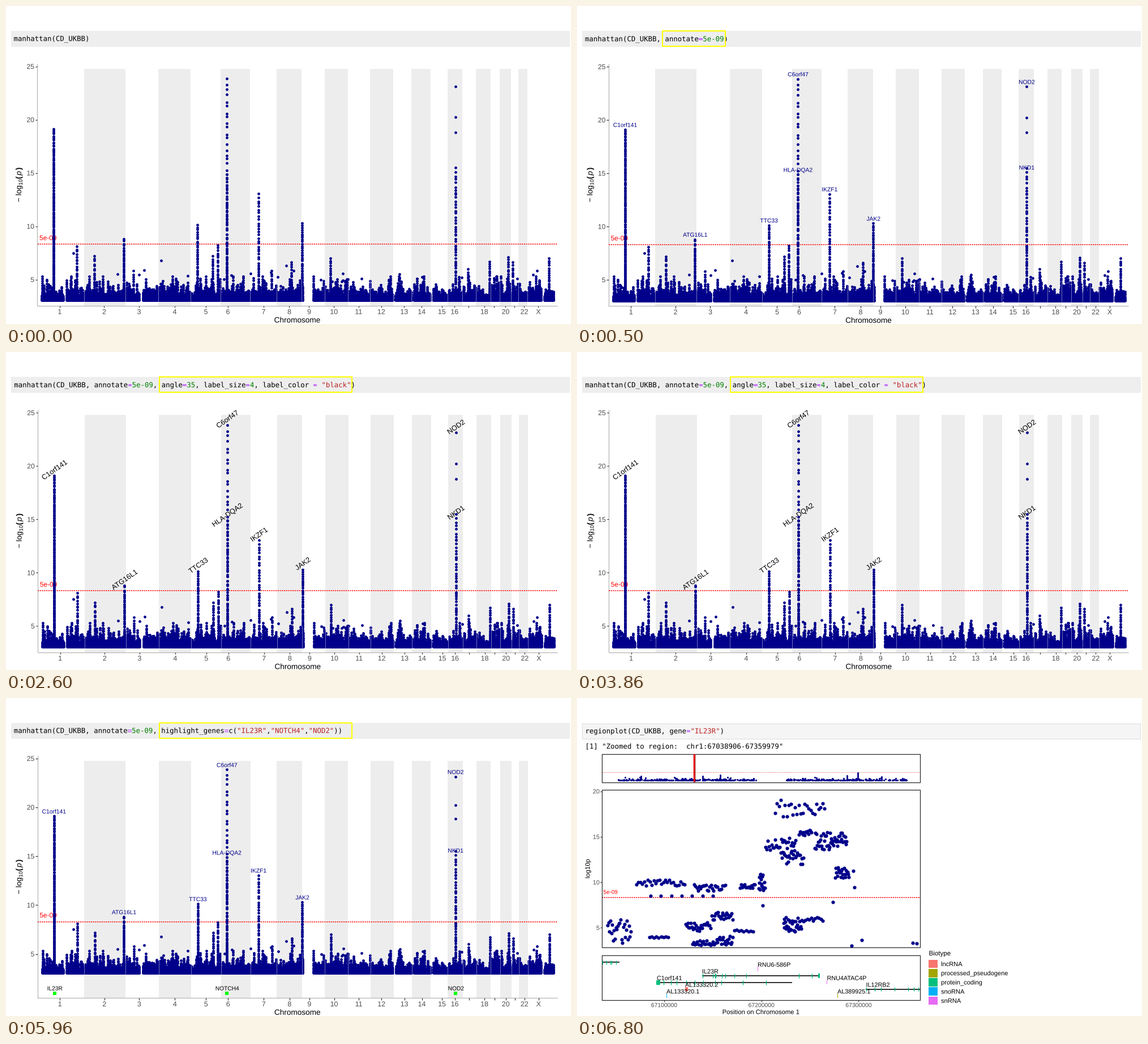
Animation of 998x561 px, one loop 8 s. Source, as a matplotlib script:

```python
import numpy as np
import matplotlib.pyplot as plt
from matplotlib.animation import FuncAnimation
from matplotlib.patches import PathPatch, Rectangle
from matplotlib.textpath import TextPath
from matplotlib.transforms import Affine2D

W, H = 998, 561
PT = 0.72  # points per pixel at 100 dpi
NAVY, RED, PURPLE, GREEN, CRIMSON = "#00008b", "#ff0000", "#aa22ff", "#008000", "#ba2121"
MONO_STEP = 7.44

plt.rcParams.update({
    "mathtext.fontset": "custom", "mathtext.rm": "Liberation Sans",
    "mathtext.it": "Liberation Sans:italic", "mathtext.bf": "Liberation Sans:bold",
})
fig = plt.figure(figsize=(W / 100, H / 100), dpi=100, facecolor="white")
rng = np.random.default_rng(23)


# ---------- drawing helpers, all in pixels with y downwards ----------
def new_scene():
    ax = fig.add_axes([0, 0, 1, 1], label=str(len(fig.axes)))
    ax.set(xlim=(0, W), ylim=(H, 0))
    ax.axis("off")
    return ax


def text(ax, x, y, s, size, color="black", ha="center", angle=0, family="Liberation Sans", z=3):
    """Place text with the middle of its capitals at height y."""
    path = TextPath((0, 0), s, size=size, prop={"family": family})
    ink = path.get_extents()
    anchor = {"left": 0, "center": (ink.x0 + ink.x1) / 2, "right": ink.x1}[ha]
    place = (Affine2D().translate(-anchor, -0.36 * size).rotate_deg(angle)
             .scale(1, -1).translate(x, y))
    ax.add_patch(PathPatch(path, facecolor=color, lw=0, zorder=z,
                           transform=place + ax.transData))


def line(ax, xs, ys, color="black", width=1.0, z=2, **kw):
    ax.plot(xs, ys, color=color, lw=width * PT, zorder=z,
            solid_capstyle="butt", dash_capstyle="butt", **kw)


def box(ax, x0, y0, x1, y1, fill="none", edge="none", width=0, z=1):
    ax.add_patch(Rectangle((x0, y0), x1 - x0, y1 - y0, facecolor=fill,
                           edgecolor=edge, lw=width * PT, zorder=z))


def dots(ax, x, y, size, z=4):
    ax.plot(x, y, "o", color=NAVY, ms=size * PT, mew=0, zorder=z)


def code(ax, x, y, *runs):
    for run in runs:
        s, color = run if isinstance(run, tuple) else (run, "black")
        text(ax, x, y, s, 12.36, color, "left", family="DejaVu Sans Mono")
        x += MONO_STEP * len(s)


def dotted(ax, x0, x1, y):
    line(ax, [x0, x1], [y, y], RED, 1.5, linestyle=(0, (1.5, 1.0)))


# ---------- genome-wide data ----------
WIDTHS = [74.5, 73, 58.5, 57, 53, 52, 46.5, 44.5, 40.5, 41, 39.5, 41,
          32, 33.5, 30, 26.5, 24, 25.5, 16.5, 20, 13, 16, 46]
EDGES = 64 + np.concatenate([[0], np.cumsum(WIDTHS)])
TICKS = [95.5, 174, 235.5, 298.5, 353.5, 392.5, 455.5, 501, 536, 580, 623.5, 663.5,
         704, 735, 770.5, 793, 818, 845.5, 863, 883, 899, 916, 941]
GAPS = [(102, 107), (236, 242), (525, 543), (684, 688), (717, 721), (750, 755), (946, 951)]

# gene, x, top, points in its tower
GENES = [("C1orf141", 85, 19.1, 150), ("C6orf47", 390.5, 23.85, 55),
         ("HLA-DQA2", 390.5, 14.88, 50), ("NOD2", 794.5, 23.13, 12), ("NKD1", 794.5, 15.1, 50),
         ("IKZF1", 446.5, 13.05, 45), ("TTC33", 339, 10.13, 45), ("JAK2", 523.5, 10.3, 50),
         ("ATG16L1", 208.5, 8.8, 40)]
MINOR_TOWERS = {126: 8.1, 157: 7.2, 226: 5.8, 366: 7.2, 374.5: 8.2, 470: 5.8, 505: 6.6,
                574: 7, 696: 5.5, 817: 6, 855: 6.7, 888: 7.1, 896: 6.6, 960: 7}
STRAYS = 30


def tower(x, top, n):
    """Column of points that thins out towards its top."""
    rise = np.linspace(0, 1, n)
    rise[1:-1] += rng.uniform(-0.4, 0.4, n - 2) / n
    return np.full(n, x), 3.05 + (top - 3.05) * rise ** 1.4


def genome():
    towers = []
    for x in np.arange(EDGES[0], EDGES[-1], 0.85):
        if not any(a < x < b for a, b in GAPS):
            height = min(0.4 + rng.exponential(0.46), 2.3)
            towers.append(tower(x, 3 + height, 4 + int(height * 5)))
    towers += [tower(x, top, n) for _, x, top, n in GENES]
    towers += [tower(x, top, int(6 * (top - 3))) for x, top in MINOR_TOWERS.items()]
    strays = rng.uniform(EDGES[0], EDGES[-1], STRAYS), 4.8 + rng.exponential(0.6, STRAYS)
    return np.hstack(towers + [strays])


GENOME_X, GENOME_P = genome()


def manhattan(runs, top, unit, bottom, dx=0.0, labels=None, frame=None):
    ax = new_scene()

    def py(p):
        return top + (25 - p) * unit

    box(ax, 9, 43.5, 996, 71.5, "#eeeeee")
    code(ax, 14 + dx, top - 49.2, *runs)
    if frame:
        box(ax, frame[0], 44, frame[1], 71, edge="#ffff00", width=2, z=6)

    floor = py(3) + 2
    for a, b in zip(EDGES[1:-1:2], EDGES[2::2]):
        box(ax, a + dx, 110.5, b + dx, bottom, "#ededed", z=0)
        for x in (a, b):
            line(ax, [x + dx] * 2, [floor - 40, floor], "#ededed", 0.8, z=5, alpha=0.6)
    line(ax, [56 + dx] * 2, [102, bottom], "#b8b8b8", 1.3)
    line(ax, [55.5 + dx, 974], [bottom] * 2, "#b8b8b8", 1.3)
    for p in range(5, 26, 5):
        line(ax, [52.5 + dx, 56 + dx], [py(p)] * 2, "#333333", 1.2)
        text(ax, 50 + dx, py(p), str(p), 12.2, "#4d4d4d", "right")
    for k, x in enumerate(TICKS, 1):
        line(ax, [x + dx] * 2, [bottom, bottom + 3.5], "#333333", 1.2)
        if k not in (17, 19, 21):
            text(ax, x + dx, bottom + 10.5, "X" if k == 23 else str(k), 12.4, "#4d4d4d")
    text(ax, 515 + dx, bottom + 25, "Chromosome", 13.6)
    text(ax, 22.5 + dx, 315.5, r"$-\ \mathrm{log}_{10}\mathbf{(}\,p\,\mathbf{)}$", 13.6, angle=90)

    dotted(ax, 56, 974, py(8.3))
    text(ax, 59.5 + dx, py(8.3) - 11.7, "5e-09", 11.9, RED, "left")
    dots(ax, GENOME_X + dx, py(GENOME_P), 4.8)
    if labels:
        size, color, angle, rise = labels
        for name, x, p, _ in GENES:
            text(ax, x + dx, py(p) - rise, name, size, color, angle=angle)
    return ax


# ---------- regional plot ----------
# x0, x1, y0, y1 of each group of linked variants
BLOCKS = [(350, 437, 178, 210), (333, 386, 247, 268), (392, 414, 232, 242),
          (420, 448, 236, 268), (449, 476, 238, 262), (456, 480, 299, 318),
          (321, 332, 309, 340), (105, 190, 320, 331), (207, 262, 329, 341),
          (288, 314, 328, 336), (360, 400, 268, 294), (130, 240, 348.5, 349),
          (128, 161, 420, 423), (204, 240, 427, 436), (240, 275, 420, 435),
          (192, 236, 396, 411), (238, 275, 378, 392), (278, 311, 409, 412),
          (365, 396, 394, 413), (366, 434, 387, 394), (54, 95, 390, 434)]
OUTLIERS = [(488, 305), (490, 334), (452, 360), (328, 366),
            (485, 437), (503, 427), (593, 432), (600, 433)]
BIOTYPES = {"lncRNA": "#f8766d", "processed_pseudogene": "#a3a500",
            "protein_coding": "#00bf7d", "snoRNA": "#00b0f6", "snRNA": "#e76bf3"}
# gene, x, row, length, biotype
TRACKS = [("", 44, -1, 31, "protein_coding"), ("RNU6-586P", 319, 0, 1, "snRNA"),
          ("IL23R", 221, 1, 207, "protein_coding"), ("C1orf141", 141, 2, 239, "protein_coding"),
          ("RNU4ATAC4P", 441.5, 2, 1, "snRNA"), ("AL133320.2", 191, 3, 5, "lncRNA"),
          ("IL12RB2", 510.5, 3, 95.5, "protein_coding"), ("AL133320.1", 158, 4, 1, "snoRNA"),
          ("AL389925.1", 460, 4, 1, "processed_pseudogene")]


def overview(ax):
    box(ax, 44, 98.5, 606, 148.5, edge="#222222", width=1.2, z=3)
    line(ax, [44, 606], [131.2] * 2, "#e8705c", 0.9, linestyle=(0, (2, 1.5)))
    for a, b in ((69, 317), (369, 582)):
        x = rng.uniform(a, b, b - a)
        dots(ax, x, 145.5 - np.minimum(rng.exponential(1, x.size), 6), 3.2)
    for x, y in ((113, 138), (222, 138), (253, 136), (477, 137), (496, 132), (538, 139)):
        column = np.arange(y, 146, 2)
        dots(ax, np.full(column.size, x), column, 3.0)
    line(ax, [206.6] * 2, [99, 147.5], "#8b0000", 3.4, z=5)
    line(ax, [206.6] * 2, [99, 147.5], RED, 2.2, z=6)


def association(ax):
    box(ax, 44, 161.5, 606, 440, edge="#222222", width=1.2, z=3)
    for p in range(5, 21, 5):
        y = 164.5 + (20 - p) * 16.05
        line(ax, [41, 44], [y, y], "#333333", 1.1)
        text(ax, 39.5, y, str(p), 10.8, "#4d4d4d", "right")
    text(ax, 18.5, 301, "log10p", 11.4, angle=90)
    dotted(ax, 44, 606, 352)
    text(ax, 46.5, 342, "5e-09", 9.9, RED, "left")
    for x0, x1, y0, y1 in BLOCKS:
        n = int(min(np.sqrt((x1 - x0) * (y1 - y0)), 26))
        dots(ax, np.linspace(x0, x1, n), rng.uniform(y0, y1, n), 6.2)
    dots(ax, *np.transpose(OUTLIERS), 6.2)


def gene_tracks(ax):
    box(ax, 44, 454, 606, 533, edge="#222222", width=1.2, z=3)
    for name, x, row, length, biotype in TRACKS:
        y = 470.2 + 11.8 * row
        color = BIOTYPES[biotype]
        if length > 10:
            line(ax, [x, x + length], [y + 8] * 2, "black", 1.6)
            exons = np.append(rng.uniform(x, x + length, 4 + int(length / 35)), x + 1)
            for exon in exons:
                line(ax, [exon] * 2, [y + 4.3, y + 11.7], color, 1.3, z=4)
        else:
            box(ax, x, y + 4, x + length, y + 11.5, color, z=2)
        if name:
            text(ax, x, y, name, 10.8, ha="left", z=5)
    green = BIOTYPES["protein_coding"]
    box(ax, 140.5, 498, 147.5, 505.5, green, z=4)
    box(ax, 425.8, 486, 428.8, 493.7, green, z=4)
    for k in range(3):
        x = 154 + 171.75 * k
        line(ax, [x, x], [533, 536], "#333333", 1.1)
        text(ax, x, 541.5, str(67100000 + k * 100000), 10.4, "#4d4d4d")
    text(ax, 325, 553.5, "Position on Chromosome 1", 11.3)


def regionplot():
    ax = new_scene()
    box(ax, 9.5, 44.5, 995.5, 71.5, "#f5f5f5", "#dcdcdc", 1)
    code(ax, 14.5, 58, "regionplot(CD_UKBB, gene", ("=", PURPLE), ('"IL23R"', CRIMSON), ")")
    code(ax, 14.5, 85, '[1] "Zoomed to region:  chr1:67038906-67359979"')
    overview(ax)
    association(ax)
    gene_tracks(ax)
    text(ax, 621.5, 450, "Biotype", 11.6, ha="left")
    for k, (name, color) in enumerate(BIOTYPES.items()):
        y = 469 + 16.2 * k
        box(ax, 621.5, y - 7.3, 637, y + 7.3, color)
        text(ax, 643, y, name, 11.1, ha="left")
    return ax


# ---------- scenes and timing ----------
call = "manhattan(CD_UKBB"
equals = ("=", PURPLE)
annotate = [call + ", annotate", equals, ("5e-09", GREEN)]
flat = (10.3, NAVY, 0, 8.3)

plain = manhattan([call + ")"], 106.5, 18.8, 528.5, -0.5)
annotated = manhattan(annotate + [")"], 107, 18.8, 529, labels=flat, frame=(151, 262.5))
angled = manhattan(
    annotate + [", angle", equals, ("35", GREEN), ", label_size", equals, ("4", GREEN),
                ", label_color ", equals, (' "black"', CRIMSON), ")"],
    107, 18.82, 529.5, 0.3, labels=(12.6, "black", 35, 10.5), frame=(271, 611))
highlighted = manhattan(
    annotate + [", highlight_genes", equals, "c(", ('"IL23R"', CRIMSON), ",",
                ('"NOTCH4"', CRIMSON), ",", ('"NOD2"', CRIMSON), "))"],
    106.5, 17.25, 529, -0.2, labels=flat, frame=(271, 611))
for name, x in (("IL23R", 86), ("NOTCH4", 390.5), ("NOD2", 794.5)):
    box(highlighted, x - 3, 517.5, x + 3, 523.5, "#00ff00", z=4)
    text(highlighted, x + 0.5, 512, name, 10.2)

INTERVAL = 100
scenes = [plain, annotated, angled, highlighted, regionplot()]
starts = [0, 500, 2600, 4700, 6800]


def update(i):
    current = np.searchsorted(starts, i * INTERVAL, side="right") - 1
    for k, ax in enumerate(scenes):
        ax.set_visible(k == current)
    return scenes


update(0)
anim = FuncAnimation(fig, update, frames=8000 // INTERVAL, interval=INTERVAL,
                     repeat=True, repeat_delay=0, blit=False)
plt.show()
```
